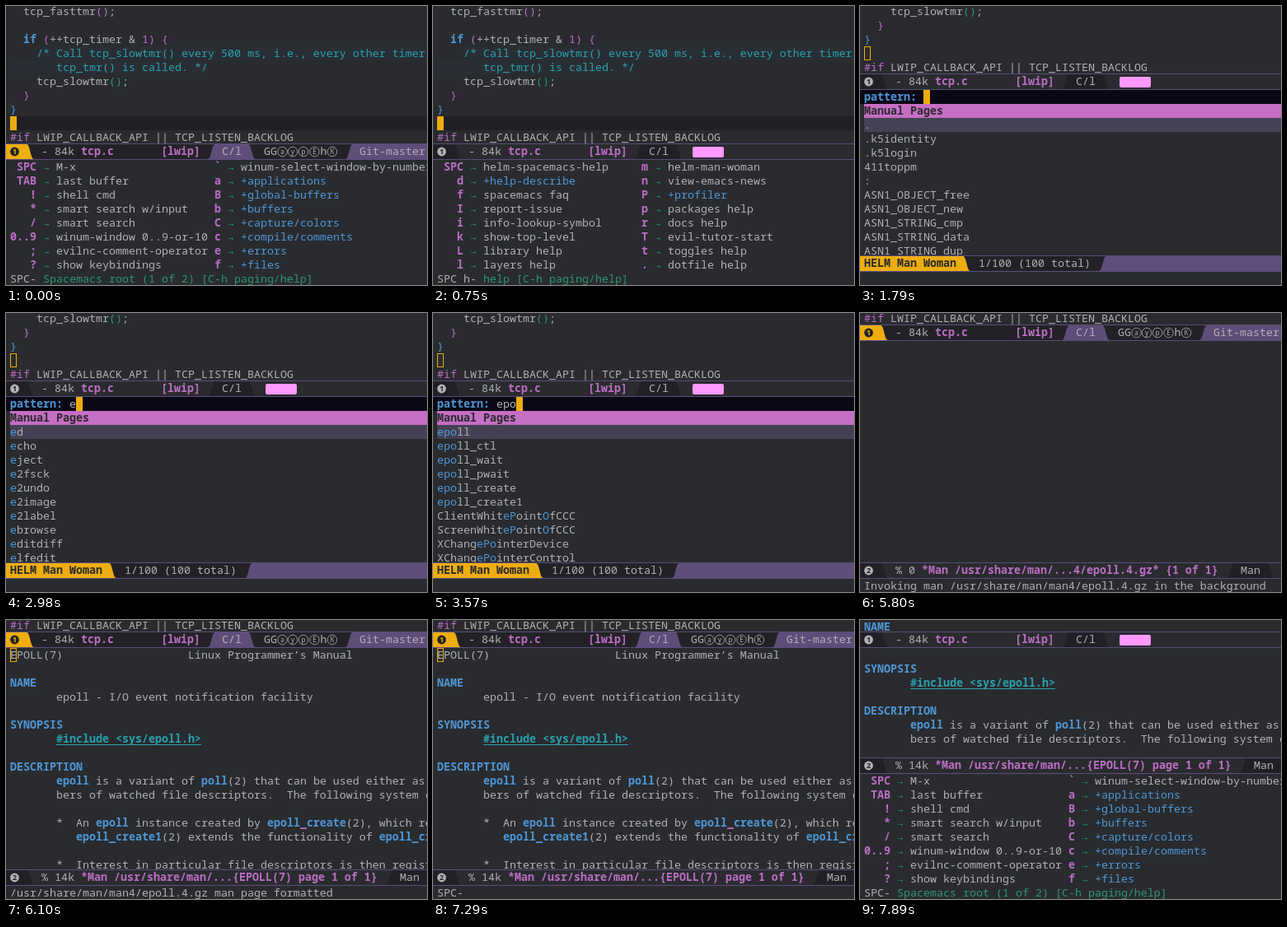
Write an HTML page that moves like this. It is 511x339 px and loops after 8000 ms.

```html
<!DOCTYPE html>
<html lang="en">
<head>
<meta charset="utf-8">
<title>Reading a man page in the editor</title>
<style>
  html, body { margin: 0; width: 100%; height: 100%; overflow: hidden; background: #292b2e; }
  svg { display: block; width: 511px; height: 339px; }
  text {
    font: 13.3333px "Noto Sans Mono", "DejaVu Sans Mono", monospace;
    white-space: pre; fill: #b2b2b2;
  }
  .b, .k { fill: #4f97d7; }
  .p, .P { fill: #bc6ec5; }
  .g { fill: #2d9574; }
  .c, .L { fill: #2aa1ae; }
  .d, .D { fill: #292b2e; }
  .k, .P, .D, .L { font-weight: 700; }
  .ring { font: 8px "Noto Sans", sans-serif; text-anchor: middle; }
  .num { font: 700 9px "Noto Sans", sans-serif; text-anchor: middle; }
</style>
</head>
<body>
<svg id="stage" viewBox="0 0 511 339"></svg>
<script>
const LOOP = 8000, LINE = 17, CELL = 8, LEFT = 5;
const BG = '#292b2e', DARK = '#222226', DIM = '#212026', VIOLET = '#5d4d7a',
      GOLD = '#eead0e', PINK = '#c56ec3', SELECT = '#444155', GREY = '#b2b2b2';

const col = n => LEFT + n * CELL;
const esc = s => s.replace(/&/g, '&amp;').replace(/</g, '&lt;').replace(/>/g, '&gt;');
// ‹kfoo› gives "foo" the class k
const markup = s => esc(s).replace(/‹(\w)([^›]*)›/g, '<tspan class="$1">$2</tspan>');
const text = (x, top, s, cls = '') =>
  `<text x="${x}" y="${top + 13}" class="${cls}">${markup(s)}</text>`;
const rect = (x, y, w, h, fill) =>
  `<rect x="${x}" y="${y}" width="${w}" height="${h}" fill="${fill}"/>`;
const lines = (top, list) =>
  list.map((s, i) => s ? text(LEFT, top + i * LINE, s) : '').join('');
const block = (x, y) => rect(x, y, CELL, LINE, GOLD);
const hollow = (x, y) =>
  `<rect x="${x + .5}" y="${y + .5}" width="7" height="16" fill="none" stroke="${GOLD}"/>`;
const echo = s => text(LEFT, 323, s);

// ---- mode lines ----

// Segment with wavy sides; flare 9 widens it downwards, -9 upwards
function segment(y, l, r, fill, fl = 9, fr = 9) {
  const a = y + 1, z = y + 19, lt = l + fl, rt = r - fr;
  const lm = (l + lt) / 2, rm = (r + rt) / 2;
  return `<path fill="${fill}" d="M${lt} ${a}H${rt}C${rm} ${a} ${rm} ${z} ${r} ${z}` +
    `H${l}C${lm} ${z} ${lm} ${a} ${lt} ${a}Z"/>`;
}

const frame = (y, fill) => rect(0, y, 511, 20, VIOLET) + rect(0, y + 1, 511, 18, fill);

function badge(y, n, disc, ink) {
  return `<circle cx="10.5" cy="${y + 10}" r="5.4" fill="${disc}"/>` +
    `<text class="num" x="10.5" y="${y + 13.3}" style="fill:${ink}">${n}</text>`;
}

const ringed = (x, y, ch) =>
  `<circle cx="${x}" cy="${y + 10}" r="5.8" fill="none" stroke="${GREY}" stroke-width=".8"/>` +
  `<text class="ring" x="${x}" y="${y + 12.6}">${ch}</text>`;

function minorModes(y) {
  const rings = [[335.5, 'a'], [348, 'y'], [361, 'p'], [374.5, 'E'], [396, 'K']];
  return text(313, y + 1, 'GG') + text(381.5, y + 1, 'h') +
    rings.map(([x, ch]) => ringed(x, y, ch)).join('');
}

function codeBar(y, active) {
  return frame(y, active ? DARK : BG) +
    segment(y, -20, 34, active ? GOLD : DIM) +
    (active ? badge(y, 1, DARK, GOLD) : badge(y, 1, GREY, DIM)) +
    text(43, y + 1, '- 84k ‹Ptcp.c›') + text(188, y + 1, '[lwip]', 'P') +
    segment(y, 245, 303, active ? VIOLET : DIM) + text(262, y + 1, 'C/l') +
    (active
      ? minorModes(y) + segment(y, 412, 560, VIOLET) + text(429, y + 1, 'Git-master')
      : `<rect x="315" y="${y + 4}" width="38" height="13" rx="2" fill="#ff99ff"/>`);
}

function manBar(y, size, name) {
  const x = 43 + (size.length + 1) * CELL, end = x + name.length * CELL;
  return frame(y, BG) + segment(y, -20, 34, DIM) + badge(y, 2, GREY, DIM) +
    text(43, y + 1, size) + text(x, y + 1, name, 'P') +
    segment(y, end + 10, end + 68, DIM) + text(end + 27, y + 1, 'Man');
}

function helmBar(title, count) {
  const y = 303, end = col(title.length), from = end + 27, stop = from + count.length * CELL;
  return frame(y, VIOLET) + segment(y, -20, stop + 10, DARK, 9, -9) +
    segment(y, -20, end + 17, GOLD) +
    text(LEFT, y + 1, title, 'D') + text(from, y + 1, count);
}

// ---- buffers ----

const IF_LINE = '‹p#if› LWIP_CALLBACK_API || TCP_LISTEN_BACKLOG';
const TAIL = ['    tcp_slowtmr‹g()›;', '  ‹p}›', '‹b}›', '', IF_LINE];

const code = () =>
  rect(37, 49, 474, LINE, '#292e34') + rect(LEFT, 66, 240, LINE, '#292e34') +
  rect(LEFT, 134, 506, LINE, DIM) + block(LEFT, 134) +
  lines(-2, [
    '  tcp_fasttmr‹p()›;', '',
    '  ‹kif› ‹p(›++tcp_timer & ‹p1)› ‹p{›',
    '    ‹c/* Call tcp_slowtmr() every 500 ms, i.e., every other timer›',
    '       ‹ctcp_tmr() is called. */›',
    ...TAIL]);

const pad = ' '.repeat(7);
const MAN = [
  'EPOLL(7)' + ' '.repeat(19) + 'Linux Programmer’s Manual', '',
  '‹kNAME›', pad + 'epoll - I/O event notification facility', '',
  '‹kSYNOPSIS›', pad + '‹L#include <sys/epoll.h>›', '',
  '‹kDESCRIPTION›',
  pad + '‹kepoll› is a variant of ‹kpoll›(2) that can be used either as an',
  pad + 'bers of watched file descriptors.  The following system calls', '',
  pad + '*  An ‹kepoll› instance created by ‹kepoll›‹P_›‹kcreate›(2), which ret',
  pad + '   ‹kepoll_create1›(2) extends the functionality of ‹kepoll_create›',
  '', pad + '*  Interest in particular file descriptors is then registered'];

const manual = top => lines(top, MAN) + rect(61, top + 6 * LINE + 15, 176, 1, '#2aa1ae');

// ---- key menu ----

const ROOT = [
  ['SPC', 'M-x', '`', 'winum-select-window-by-number'],
  ['TAB', 'last buffer', 'a', '+applications'],
  ['!', 'shell cmd', 'B', '+global-buffers'],
  ['*', 'smart search w/input', 'b', '+buffers'],
  ['/', 'smart search', 'C', '+capture/colors'],
  ['0..9', 'winum-window 0..9-or-10', 'c', '+compile/comments'],
  [';', 'evilnc-comment-operator', 'e', '+errors'],
  ['?', 'show keybindings', 'f', '+files']];
const HELP = [
  ['SPC', 'helm-spacemacs-help', 'm', 'helm-man-woman'],
  ['d', '+help-describe', 'n', 'view-emacs-news'],
  ['f', 'spacemacs faq', 'P', '+profiler'],
  ['I', 'report-issue', 'p', 'packages help'],
  ['i', 'info-lookup-symbol', 'r', 'docs help'],
  ['k', 'show-top-level', 'T', 'evil-tutor-start'],
  ['L', 'library help', 't', 'toggles help'],
  ['l', 'layers help', '.', 'dotfile help']];

function menu(rows) {
  const entry = (end, y, key, what) =>
    text(col(end - key.length), y, key, 'P') + text(col(end + 1), y, '→', 'g') +
    text(col(end + 3), y, what, what[0] === '+' ? 'b' : '');
  return rows.map(([k1, w1, k2, w2], i) => {
    const y = 187 + i * LINE;
    return entry(4, y, k1, w1) + entry(32, y, k2, w2);
  }).join('');
}

// ---- completion list ----

function mark(s, typed) {
  if (!typed || s.includes('‹')) return s;
  const at = s.toLowerCase().indexOf(typed);
  if (at >= 0) {
    const end = at + typed.length;
    return s.slice(0, at) + `‹b${s.slice(at, end)}›` + s.slice(end);
  }
  let n = 0;
  return [...s].map(ch => ch.toLowerCase() === typed[n] ? (n++, `‹b${ch}›`) : ch).join('');
}

function helm({ prompt = 'pattern:', typed = '', head = 'Manual Pages',
                title = 'HELM Man Woman', count = '1/100 (100 total)', rows }) {
  let out = lines(-2, TAIL) + hollow(LEFT, 49) + codeBar(82, false) +
    rect(0, 102, 511, LINE, '#0a0814') + text(LEFT, 102, `‹k${prompt}› ${typed}`) +
    block(col(prompt.length + 1 + typed.length), 102) +
    rect(LEFT, 119, 506, LINE, PINK) + text(LEFT, 119, head, 'D') +
    rect(LEFT, 136, 506, LINE, SELECT) + lines(136, rows);
  for (let i = rows.length; i < 10; i++)
    out += `<path d="M0 ${144.5 + i * LINE}q1.25 -2.5 2.5 0t2.5 0" fill="none" stroke="${GREY}"/>`;
  return out + helmBar(title, count);
}

const EPOLL = ['epoll', 'epoll_ctl', 'epoll_wait', 'epoll_pwait', 'epoll_create', 'epoll_create1'];
const found = (typed, list) => list.map(s => mark(s, typed));
const ALL = ['.', '.k5identity', '.k5login', '411toppm', ':', 'ASN1_OBJECT_free',
  'ASN1_OBJECT_new', 'ASN1_STRING_cmp', 'ASN1_STRING_data', 'ASN1_STRING_dup'];
const E = found('e', ['ed', 'echo', 'eject', 'e2fsck', 'e2undo', 'e2image', 'e2label',
  'ebrowse', 'editdiff', 'elfedit']);
const EP = found('ep', [...EPOLL, 'eps2eps', 'epstopdf', 'ExtUtils::ParseXS',
  'Template::Plugin::Directory']);
const EPO = found('epo', [...EPOLL, 'ClientWhit‹beP›oint‹bO›fCCC', 'ScreenWhit‹beP›oint‹bO›fCCC',
  'XChangePointerDevice', 'XChangePointerControl']);
const EPOL = found('epol', [...EPOLL, 'sepol_check_context', 'XGetPointerControl',
  'XChangePointerControl', 'glDeleteProgramPipelines']);
const EPOLL_ALL = found('epoll', [...EPOLL, 'IO::Epoll', 'epoll_pwait2', 'timer_poll',
  'kernel_poll']);
// the last two rows repaint a moment later
const late = (now, before) => [...now.slice(0, 8), ...before.slice(8)];

// ---- scenes ----

const root = 'SPC- ‹gSpacemacs root (1 of 2) [C-h paging/help]›';
const MAN_FILE = '/usr/share/man/man4/epoll.4.gz';
const LOADING = '*Man /usr/share/man/...4/epoll.4.gz* {1 of 1}';
const LOADED = '*Man /usr/share/man/...{EPOLL(7) page 1 of 1}';
const invoking = `Invoking man ${MAN_FILE} in the background`;

const split = (body, bar, msg) =>
  text(LEFT, -2, IF_LINE) + codeBar(14, true) + body + bar + echo(msg);
const page = (name, msg) =>
  split(manual(34) + hollow(LEFT, 34), manBar(303, '% 14k', name), msg);
const scrolled = bar =>
  manual(-34) + bar + rect(0, 167, 511, 172, BG) + manBar(167, '% 14k', LOADED) +
  menu(ROOT) + echo(root);

const SCENES = [
  [0, () => code() + codeBar(167, true) + menu(ROOT) + echo(root)],
  [300, () => code() + codeBar(167, true) + menu(ROOT) + echo('SPC h-')],
  [750, () => code() + codeBar(167, false) + menu(HELP) + echo('SPC h- ‹ghelp [C-h paging/help]›')],
  [1790, () => helm({ rows: ALL })],
  [2840, () => helm({ typed: 'e', rows: late(E, ALL) })],
  [2980, () => helm({ typed: 'e', rows: E })],
  [3130, () => helm({ typed: 'ep', rows: late(EP, E) })],
  [3280, () => helm({ typed: 'ep', rows: EP })],
  [3570, () => helm({ typed: 'epo', rows: EPO })],
  [3870, () => helm({ typed: 'epol', rows: EPOL })],
  [4010, () => helm({ typed: 'epoll', rows: EPOLL_ALL, count: '1/15 (15 total)' })],
  [4610, () => helm({
    prompt: 'ManFile:', head: 'Helm Completions', title: 'HELM Completions',
    count: '1/2 (2 total)', rows: [MAN_FILE, '/usr/share/man/man7/epoll.7.gz'] })],
  [5800, () => split('', manBar(303, '% 0', LOADING), invoking)],
  [5950, () => page(LOADING, invoking)],
  [6100, () => page(LOADED, MAN_FILE + ' man page formatted')],
  [7290, () => page(LOADED, 'SPC-')],
  [7740, () => scrolled('')],
  [7890, () => scrolled(codeBar(14, false))]
];

const stage = document.getElementById('stage');
const start = performance.now();
let shown = -1;

function tick() {
  const t = (performance.now() - start) % LOOP;
  const i = SCENES.findLastIndex(([at]) => at <= t);
  if (i !== shown) {
    stage.innerHTML = SCENES[i][1]();
    shown = i;
  }
  requestAnimationFrame(tick);
}
tick();
</script>
</body>
</html>
```
